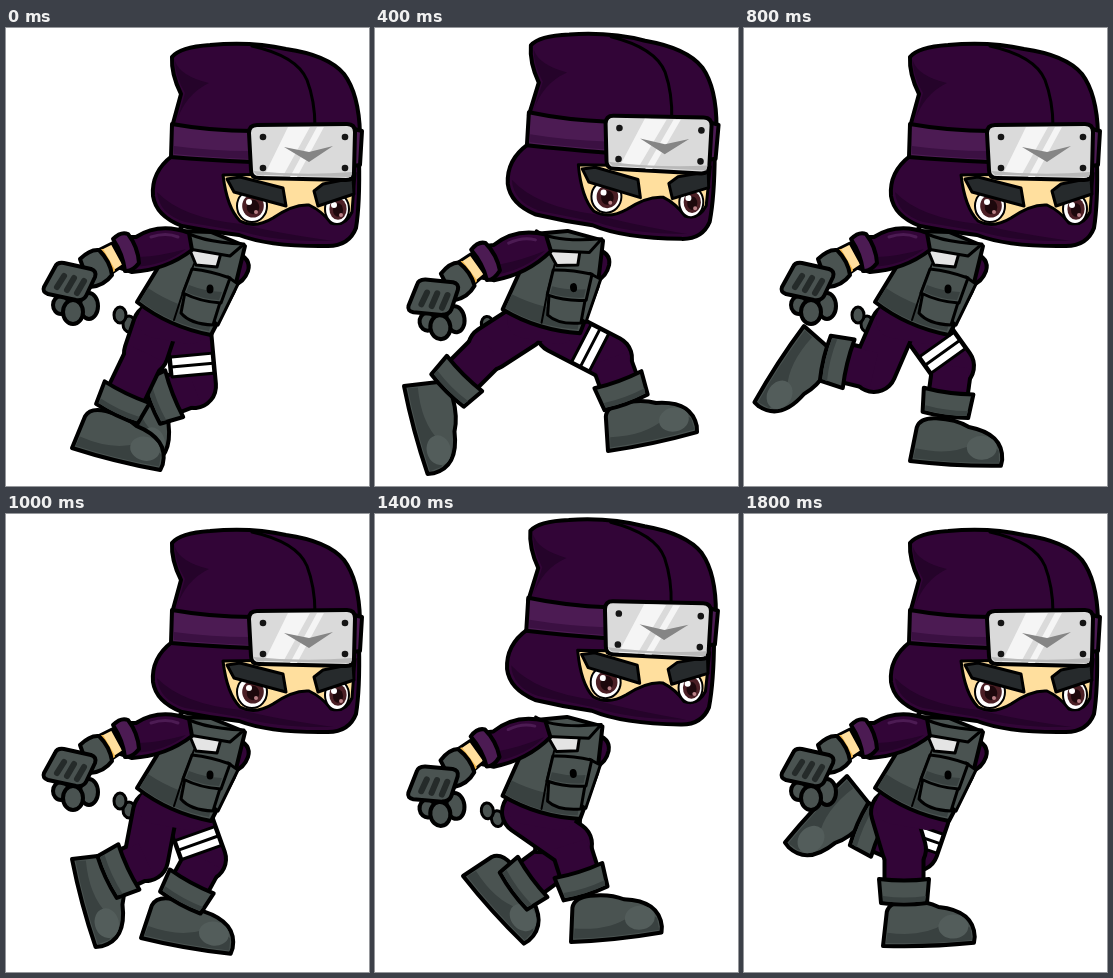
An HTML page with a canvas for the animation above (2000 ms loop, 363 by 458 pixels).

```html
<!DOCTYPE html>
<html>
<head>
<meta charset="utf-8">
<style>
html, body { margin: 0; width: 100%; height: 100%; overflow: hidden; background: #fff; }
canvas { display: block; }
</style>
</head>
<body>
<canvas id="stage" width="363" height="458"></canvas>
<script>
const ctx = document.getElementById('stage').getContext('2d');
const STEP = 200;
const PURPLE = '#320537', SHADE = '#25032a', BAND = '#4c1b53';
const GRAY = '#4a5351', DARK = '#394140', INK = '#000', SKIN = '#ffdf9e';

// Backward sway of the upper body, one value per step.
const sway = [0, .5, 1, .6, 0, 0, .57, 1.05, .95, 0];

// Each step: knee x,y, cuff x,y, heel x,y, sole angle in degrees.
const nearLeg = [
  [140, 325, 116, 375, 66, 420, 14],
  [133, 328, 97, 368, 43, 395, 43],
  [115, 320, 81, 354, 29, 358, 75],
  [112, 330, 72, 342, 27, 318, 105],
  [130, 342, 93, 333, 60, 298, 123],
  [140, 345, 112, 358, 66, 345, 75],
  [170, 335, 160, 368, 102, 420, 19],
  [195, 330, 207, 368, 196, 428, -6],
  [186, 328, 204, 353, 207, 408, -20],
  [160, 335, 160, 377, 139, 432, -2]
];
const farLeg = [
  [188, 358, 157, 370, 112, 350, 75],
  [212, 350, 200, 382, 152, 432, 11],
  [235, 330, 247, 363, 233, 423, -12],
  [225, 335, 232, 372, 210, 434, -3],
  [208, 338, 203, 375, 166, 433, 3],
  [198, 345, 180, 378, 135, 424, 10],
  [190, 345, 168, 372, 104, 410, 20],
  [182, 345, 148, 370, 88, 362, 48],
  [158, 338, 128, 340, 67, 316, 80],
  [172, 335, 126, 315, 103, 262, 133]
];

const rad = deg => deg * Math.PI / 180;

function shape(d, fill, width = 4, line = INK) {
  const path = new Path2D(d);
  if (fill) { ctx.fillStyle = fill; ctx.fill(path); }
  if (width) { ctx.lineWidth = width; ctx.strokeStyle = line; ctx.stroke(path); }
}

function oval(x, y, rx, ry, fill, width = 0) {
  ctx.beginPath();
  ctx.ellipse(x, y, rx, ry, 0, 0, 7);
  ctx.fillStyle = fill;
  ctx.fill();
  if (width) { ctx.lineWidth = width; ctx.strokeStyle = INK; ctx.stroke(); }
}

function limb(points, width, color) {
  ctx.beginPath();
  points.forEach(p => ctx.lineTo(...p));
  ctx.lineWidth = width;
  ctx.strokeStyle = color;
  ctx.stroke();
}

function placed(x, y, angle, draw) {
  ctx.save();
  ctx.translate(x, y);
  ctx.rotate(angle);
  draw();
  ctx.restore();
}

function foot() {
  shape('M0 0 L5 -34 Q8 -44 24 -44 Q44 -44 57 -37 Q92 -32 92 -6 L91 0 Q45 3 0 0Z', GRAY);
  shape('M3 -3 L5 -13 Q40 -7 62 -20 Q78 -24 88 -15 L89 -3 Q45 0 3 -3Z', DARK, 0);
  oval(71, -17, 15, 12, '#535d5b');
}

function leg(hip, [kx, ky, cx, cy, hx, hy, tilt], bandaged) {
  const thigh = [hip, [kx, ky]], shin = [[kx, ky], [cx, cy]];
  placed(hx, hy, rad(tilt), foot);
  ctx.lineCap = 'round';
  limb(thigh, 48, INK);
  ctx.lineCap = 'butt';
  limb(shin, 43, INK);
  ctx.lineCap = 'round';
  limb(thigh, 40, PURPLE);
  ctx.lineCap = 'butt';
  limb(shin, 35, PURPLE);
  ctx.lineCap = 'round';
  if (bandaged) {
    const x = hip[0] + (kx - hip[0]) * .62, y = hip[1] + (ky - hip[1]) * .62;
    placed(x, y, Math.atan2(ky - hip[1], kx - hip[0]) - Math.PI / 2, () => {
      shape('M-21 -10 L21 -10 L21 10 L-21 10Z', '#fff', 3);
      shape('M-21 0 L21 0', null, 3);
    });
  }
  placed(cx, cy, Math.atan2(cy - ky, cx - kx) - Math.PI / 2, () => {
    shape('M-25 -12 Q0 -9 25 -12 L23 12 Q0 15 -23 12Z', GRAY);
    shape('M-21 5 Q0 8 22 5 L21 10 Q0 13 -21 10Z', DARK, 0);
  });
}

function torso() {
  shape('M228 224 Q246 230 242 243 Q238 254 228 257Z', PURPLE);
  shape('M174 203 L153 238 L131 274 Q163 299 205 307 L228 263 L239 218 L205 204Z', GRAY);
  shape('M134 273 L142 260 Q170 279 208 286 L203 303 Q164 296 134 273Z', DARK, 0);
  shape('M222 249 L232 256 L212 297 L206 292Z', GRAY, 3);
  shape('M183 220 L215 225 L211 239 L190 237Z', '#e4e4e4', 3);
  shape('M174 200 Q190 214 238 216 L224 228 L183 221Z', GRAY, 3);
  shape('M188 236 L177 264 L168 292', null, 2);
  shape('M179 264 L175 285 Q184 296 207 297 L217 265Z', GRAY, 3);
  shape('M186 241 Q205 243 224 250 L215 275 Q195 274 177 265Z', GRAY, 3);
  shape('M180 264 Q196 271 213 272 L216 264 Q198 263 183 257Z', DARK, 0);
  oval(204, 261, 3.5, 4.5, INK);
}

function arm() {
  shape('M183 205 Q154 194 130 209 L110 209 Q104 223 112 239 L126 244 Q160 242 186 222Z', PURPLE);
  shape('M128 239 Q160 237 180 221 Q155 228 133 229Z', SHADE, 0);
  shape('M145 209 Q160 204 172 209', null, 3, BAND);
  shape('M90 223 L106 215 L118 237 L103 247Z', SKIN, 3);
  shape('M96 223 L107 242', null, 4, '#f5b84b');
  shape('M107 211 Q115 203 122 206 Q132 219 133 235 Q126 244 119 243 Q117 226 107 211Z', BAND);
  shape('M74 231 Q84 221 93 222 Q104 233 106 247 Q98 258 84 259Z', GRAY);
  oval(83, 278, 9, 13, GRAY, 4);
  oval(55, 277, 8, 9, GRAY, 4);
  oval(67, 284, 10, 12, GRAY, 4);
  shape('M49 239 Q51 234 58 235 L85 241 Q91 243 89 249 L80 268 Q77 273 70 272 L42 266 Q36 264 38 259Z', GRAY);
  limb([[58, 248], [51, 259]], 6, '#252b2a');
  limb([[68, 250], [61, 262]], 6, '#252b2a');
  limb([[78, 253], [71, 265]], 6, '#252b2a');
}

function eye(x, y, rx, ry) {
  oval(x, y, rx, ry, '#fff', 2);
  oval(x + 1, y, rx * .72, ry * .72, '#4b1f25');
  oval(x + 1, y + 1, rx * .42, ry * .45, '#1d080c');
  oval(x - 3, y - 4, 3, 3, '#fff');
  oval(x + 4, y + 6, 2, 2, '#b98086');
}

function plate() {
  shape('M251 97 L341 96 Q349 96 349 104 L348 144 Q348 152 340 152 L253 150 Q245 150 245 142 L243 105 Q243 97 251 97Z', '#dadada');
  shape('M282 99 L304 99 L277 148 L258 148Z M311 99 L318 99 L291 149 L284 149Z', '#f5f5f5', 0);
  shape('M247 143 Q297 148 346 144 L345 149 L251 147Z', '#b9b9b9', 0);
  shape('M278 119 L303 124 L327 118 L303 134Z', '#858585', 0);
  for (const x of [257, 339]) for (const y of [109, 140]) oval(x, y, 3.3, 3.3, '#151515');
}

function head() {
  shape('M166 128 Q145 144 147 168 Q150 188 176 198 Q205 204 233 207 Q264 219 322 218 Q343 218 350 200 Q354 175 353 132Z', PURPLE);
  shape('M151 164 Q153 186 179 194 Q210 199 238 204 Q270 214 328 213 Q270 205 235 196 Q176 190 151 164Z', SHADE, 0);
  shape('M217 147 Q221 180 234 193 Q249 201 267 190 Q287 176 303 177 Q316 183 325 195 Q339 199 346 184 L349 145Z', SKIN, 3);
  eye(246, 178, 15, 16);
  eye(331, 181, 12, 15);
  shape('M221 151 L234 149 L277 160 L280 178 L228 164Z', '#262a2c', 3);
  shape('M308 163 L317 156 L347 150 L348 166 L312 178Z', '#262a2c', 3);
  shape('M166 99 L175 66 Q165 46 166 29 Q174 19 204 17 Q245 13 280 21 Q322 27 338 46 Q353 66 354 106 L250 105Z', PURPLE);
  shape('M169 33 Q174 48 203 55 Q178 67 170 96 Q176 76 179 65 Q169 48 169 33Z', SHADE, 0);
  shape('M246 18 Q291 28 301 52 Q309 73 309 99', null, 3);
  shape('M166 96 Q205 103 246 103 L246 134 Q200 132 165 129Z', BAND);
  shape('M168 118 Q205 123 244 123 L244 131 Q200 129 168 126Z', '#3b1042', 0);
  shape('M348 101 L356 103 L354 137 L347 138Z', BAND);
  plate();
}

function draw(step) {
  const lean = sway[step];
  const withBody = paint => {
    ctx.save();
    ctx.translate(190, 305);
    ctx.rotate(rad(-7 * lean));
    ctx.translate(-190, -305);
    paint();
    ctx.restore();
  };

  ctx.fillStyle = '#fff';
  ctx.fillRect(0, 0, 363, 458);
  ctx.lineJoin = ctx.lineCap = 'round';

  withBody(() => {
    oval(123, 296, 6, 8, GRAY, 3);
    oval(114, 287, 6, 8, GRAY, 3);
  });
  leg([183, 303], farLeg[step], true);
  leg([149, 298], nearLeg[step], false);
  limb([[150, 292], [184, 298]], 36, PURPLE);
  withBody(() => { torso(); arm(); });

  ctx.save();
  ctx.translate(298 - 13 * lean, 124 - 7.8 * lean);
  ctx.rotate(rad(1.7 * lean));
  ctx.translate(-298, -124);
  head();
  ctx.restore();
}

function tick() {
  draw(Math.floor(performance.now() / STEP) % sway.length);
  requestAnimationFrame(tick);
}
tick();
</script>
</body>
</html>
```
